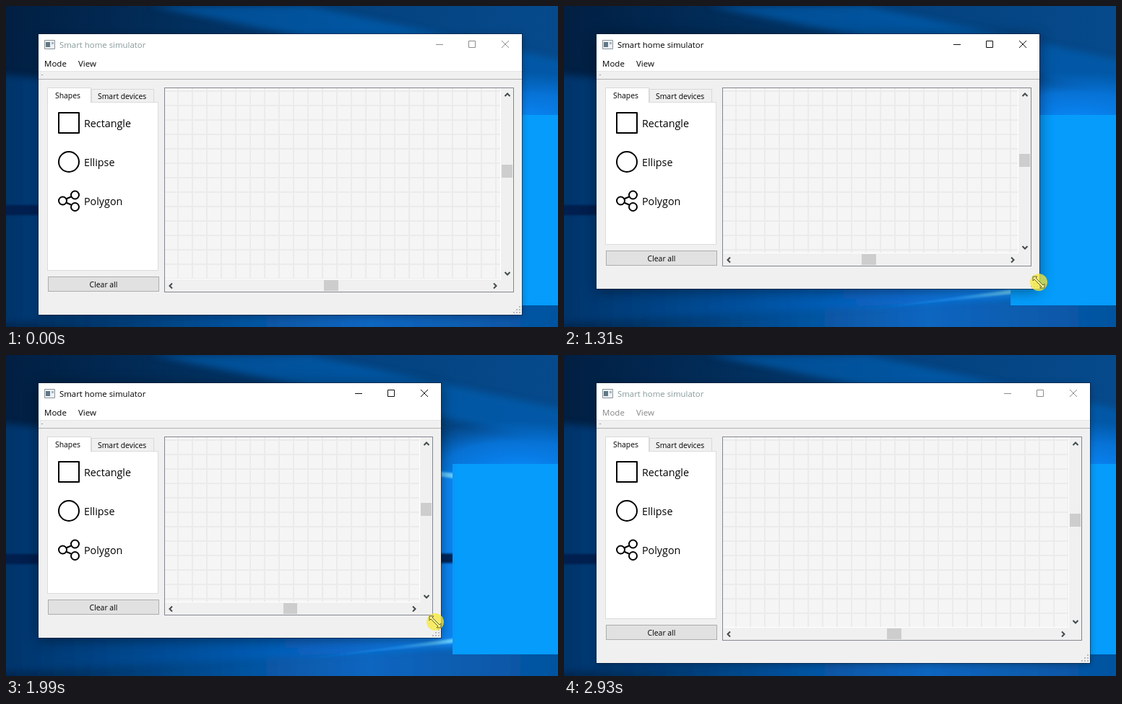
Write an HTML page that moves like this. It is 764 px wide and 445 px high and loops after 3030 ms.

```html
<!DOCTYPE html>
<html lang="en">
<head>
<meta charset="utf-8">
<title>Resizable window</title>
<style>
html, body { margin: 0; width: 100%; height: 100%; overflow: hidden; }
body { position: relative; background: #02264f; font-family: "Open Sans", sans-serif; color: #000; }
svg { position: absolute; overflow: visible; }
#win, #win div, #win span { position: absolute; box-sizing: border-box; }
#win span { line-height: 20px; white-space: nowrap; }

#win { left: 45px; top: 39px; background: #f0f0f0; font-size: 10.4px;
  box-shadow: 0 0 0 1px rgba(0, 20, 45, .55), 0 3px 18px rgba(0, 0, 0, .45); }
#win.idle { box-shadow: 0 0 0 1px rgba(0, 20, 45, .5), 0 2px 9px rgba(0, 0, 0, .3); }
.bar { left: 0; right: 0; top: 0; height: 52px; background: #fff; border-bottom: 1px solid #e6e6e6; }
.tools { left: 0; right: 0; top: 62px; height: 1px; background: #b2b2b2; }
.handle { left: 4px; top: 56px; width: 2px; height: 1px; background: #999; }
.title { left: 29px; top: 5px; font-size: 11.4px; }
.menu { top: 31px; font-size: 11.5px; }
.idle .title { color: #87999a; }
.grey .menu { color: #858585; }
.buttons { right: 0; top: 0; width: 137px; height: 30px; fill: none; stroke: #111; }
.idle .buttons { stroke: #8c8c8c; }

.panel { left: 12px; top: 94px; width: 154px; bottom: 61px; background: #fff; border: 1px solid #dcdcdc; }
.tab { border: 1px solid #d9d9d9; border-bottom: 0; }
.tab.on { left: 12px; top: 74px; width: 61px; height: 21px; background: #fff; }
.tab.off { left: 73px; top: 76px; width: 87px; height: 18px; background: #f0f0f0; }
.shape { left: 63px; font-size: 14.3px; }
.clear { left: 13px; width: 154px; bottom: 32px; height: 21px; background: #e1e1e1;
  border: 1px solid #adadad; text-align: center; line-height: 20px; }

.view { left: 174px; top: 74px; right: 11px; bottom: 31px; border: 1px solid #828790; background: #f0f0f0; }
.grid { left: 0; top: 0; right: 17px; bottom: 17px; background-color: #f5f5f5;
  border: solid #fff; border-width: 0 1px 1px 0;
  background-image: linear-gradient(90deg, #ebebeb 2px, transparent 2px), linear-gradient(#ebebeb 2px, transparent 2px);
  background-size: 20px 20px; background-position: 17px 0, 0 3px; }
.thumb { background: #cdcdcd; }
#vThumb { right: 1px; width: 15px; height: 18px; }
#hThumb { bottom: 1px; height: 15px; }
.arrow { width: 10px; height: 10px; fill: none; stroke: #424a4c; stroke-width: 2; }
.grip { right: 2px; bottom: 2px; width: 10px; height: 10px; fill: #b9b9b9; }
#cursor { left: 0; top: 0; width: 1px; height: 1px; }
</style>
</head>
<body>
<svg width="764" height="445" viewBox="0 0 764 445" style="left:0;top:0;overflow:hidden">
  <defs>
    <linearGradient id="night">
      <stop offset="0" stop-color="#011f42"/><stop offset=".35" stop-color="#02305f"/>
      <stop offset=".65" stop-color="#04427f"/><stop offset="1" stop-color="#064a8c"/>
    </linearGradient>
    <linearGradient id="cone" gradientUnits="userSpaceOnUse" x1="0" y1="0" x2="764" y2="0">
      <stop offset="0" stop-color="#02346a"/><stop offset=".33" stop-color="#05509e"/>
      <stop offset=".6" stop-color="#0769cd"/><stop offset=".8" stop-color="#0885f2"/>
      <stop offset="1" stop-color="#088cf8"/>
    </linearGradient>
    <linearGradient id="floor">
      <stop offset="0" stop-color="#022449"/><stop offset=".4" stop-color="#064f98"/>
      <stop offset=".65" stop-color="#0766c0"/><stop offset="1" stop-color="#06519c"/>
    </linearGradient>
    <radialGradient id="glow">
      <stop offset="0" stop-color="#0a8cff"/><stop offset=".6" stop-color="#0880ee" stop-opacity=".75"/>
      <stop offset="1" stop-color="#0670d4" stop-opacity="0"/>
    </radialGradient>
    <linearGradient id="beam">
      <stop offset="0" stop-color="#1480e0" stop-opacity="0"/><stop offset=".65" stop-color="#1a90f4" stop-opacity=".7"/>
      <stop offset="1" stop-color="#6cd2ff"/>
    </linearGradient>
    <filter id="soft" x="-20%" y="-50%" width="140%" height="200%"><feGaussianBlur stdDeviation="5"/></filter>
    <filter id="thin" x="-20%" y="-50%" width="140%" height="200%"><feGaussianBlur stdDeviation="1"/></filter>
  </defs>
  <rect width="764" height="445" fill="url(#night)"/>
  <g filter="url(#soft)">
    <path d="M200 0H420L780 78V126L430 46Z" fill="#0a63ba" opacity=".6"/>
    <path d="M-20 380H784V465H-20Z" fill="url(#floor)"/>
  </g>
  <ellipse cx="710" cy="165" rx="190" ry="75" fill="url(#glow)"/>
  <path d="M-10 94L440 141L620 162H780V405H620L-10 440Z" fill="url(#cone)" filter="url(#soft)"/>
  <path d="M-10 276L780 275V288L-10 290Z" fill="#021f4c" opacity=".9" filter="url(#thin)"/>
  <g fill="url(#beam)" filter="url(#thin)">
    <path d="M390 138L620 164V171Z"/>
    <path d="M390 424L620 393V399Z"/>
  </g>
  <rect x="618" y="151" width="264" height="264" fill="#059cfb"/>
</svg>

<div id="win">
  <div class="bar"></div><div class="tools"></div><div class="handle"></div>
  <svg style="left:8px;top:8px" width="15" height="13">
    <path d="M.5 .5H14.5V12.5H.5Z" fill="#eef1f3" stroke="#89939a"/>
    <path d="M2 3H8V10H2Z" fill="#607786"/><path d="M10 3H13V6H10Z" fill="#a5b6c0"/>
  </svg>
  <span class="title">Smart home simulator</span>
  <svg class="buttons"><path d="M18 14.5H28M63.5 9.5H72.5V18.5H63.5ZM109 9L119 19M119 9L109 19"/></svg>
  <span class="menu" style="left:8px">Mode</span>
  <span class="menu" style="left:55px">View</span>

  <div class="panel"></div>
  <div class="tab off"></div><div class="tab on"></div>
  <span style="left:23px;top:75px">Shapes</span>
  <span style="left:82px;top:76px">Smart devices</span>
  <svg style="left:27px;top:108px" width="32" height="140" fill="none" stroke="#000" stroke-width="2">
    <path d="M1 1H29V29H1Z" stroke-linejoin="round"/>
    <circle cx="15" cy="69" r="14"/>
    <path d="M11 120.5L18 117.5M11 125.5L18 128.5"/>
    <circle cx="6.5" cy="123" r="5.5"/><circle cx="23.5" cy="115" r="5.5"/><circle cx="23.5" cy="131.5" r="5.5"/>
  </svg>
  <span class="shape" style="top:114px">Rectangle</span>
  <span class="shape" style="top:168px">Ellipse</span>
  <span class="shape" style="top:222px">Polygon</span>
  <div class="clear">Clear all</div>

  <div class="view">
    <div class="grid"></div>
    <div class="thumb" id="vThumb"></div><div class="thumb" id="hThumb"></div>
    <svg class="arrow" style="right:3px;top:4px"><path d="M1.5 7L5 3.5L8.5 7"/></svg>
    <svg class="arrow" style="right:3px;bottom:20px"><path d="M1.5 3L5 6.5L8.5 3"/></svg>
    <svg class="arrow" style="left:3px;bottom:3px"><path d="M7 1.5L3.5 5L7 8.5"/></svg>
    <svg class="arrow" style="right:20px;bottom:3px"><path d="M3 1.5L6.5 5L3 8.5"/></svg>
  </div>
  <svg class="grip"><path d="M8 0h2v2h-2zM4 4h2v2h-2zM8 4h2v2h-2zM0 8h2v2h-2zM4 8h2v2h-2zM8 8h2v2h-2z"/></svg>
</div>

<svg id="cursor">
  <circle r="12" fill="#f8ea38" fill-opacity=".75"/>
  <path id="resize" d="M-8 -8H-2L-4 -6L6 4L8 2V8H2L4 6L-6 -4L-8 -2Z" fill="#f8f08a" stroke="#66652e"/>
  <path id="pointer" d="M0 0V16L4 12.5L6.5 18L9 17L6.5 11.5H11.5Z" fill="#fff" stroke="#222"/>
</svg>

<script>
const LOOP = 3030;
// Bursts of movement: first step, last step, number of steps.
const bursts = [[570, 850, 6], [1030, 1540, 10], [1600, 1660, 2], [1820, 2230, 8], [2410, 2930, 10]];
const steps = [0, 60, ...bursts.flatMap(([from, to, n]) =>
  Array.from({ length: n }, (_, i) => Math.floor((from + (to - from) * i / (n - 1)) / 10) * 10))];

// time, right edge, bottom edge
const sizeKeys = [[0, 714, 428], [790, 714, 428], [850, 714, 427], [1030, 709, 425], [1140, 698, 418],
  [1310, 658, 392], [1420, 535, 392], [1540, 450, 392], [1660, 447, 392], [1820, 458, 392],
  [1990, 602, 392], [2110, 721, 425], [2170, 728, 427]];
// time, x, y
const cursorKeys = [[0, 698, 470], [60, 698, 470], [570, 700, 452], [850, 710, 424], [1030, 705, 421],
  [1310, 657, 383], [1420, 535, 335], [1540, 446, 300], [1660, 443, 296], [1820, 452, 303],
  [1990, 594, 370], [2110, 712, 418], [2170, 720, 423], [2410, 720, 425], [2930, 714, 470]];

const byId = id => document.getElementById(id);
const win = byId("win"), vThumb = byId("vThumb"), hThumb = byId("hThumb");
const cursor = byId("cursor"), resize = byId("resize"), pointer = byId("pointer");
const px = n => Math.round(n) + "px";

function pose(keys, t) {
  const next = keys.findIndex(key => key[0] > t);
  if (next < 0) return keys[keys.length - 1].slice(1);
  const a = keys[next - 1], b = keys[next];
  const p = (t - a[0]) / (b[0] - a[0]);
  return [1, 2].map(i => Math.round(a[i] + (b[i] - a[i]) * p));
}

function draw(time) {
  const t = steps.filter(step => step <= time).pop();
  const [right, bottom] = pose(sizeKeys, t);
  const [x, y] = pose(cursorKeys, t);
  win.style.width = px(right - 45);
  win.style.height = px(bottom - 39);
  win.classList.toggle("idle", t < 60 || t >= 2230);
  win.classList.toggle("grey", t >= 2230);

  vThumb.style.top = px(91 + (bottom - 392) * 0.42);
  const thumbWidth = Math.round(18 + (right - 447) * 0.008);
  hThumb.style.width = px(thumbWidth);
  hThumb.style.left = px(96 + (right - 447) / 2 - thumbWidth / 2);

  cursor.style.transform = `translate(${x}px, ${y}px)`;
  const resizing = t >= 740 && t < 2520;
  resize.style.display = resizing ? "" : "none";
  pointer.style.display = resizing ? "none" : "";
}

const start = performance.now();
function tick() {
  draw((performance.now() - start) % LOOP);
  requestAnimationFrame(tick);
}
tick();
</script>
</body>
</html>
```
